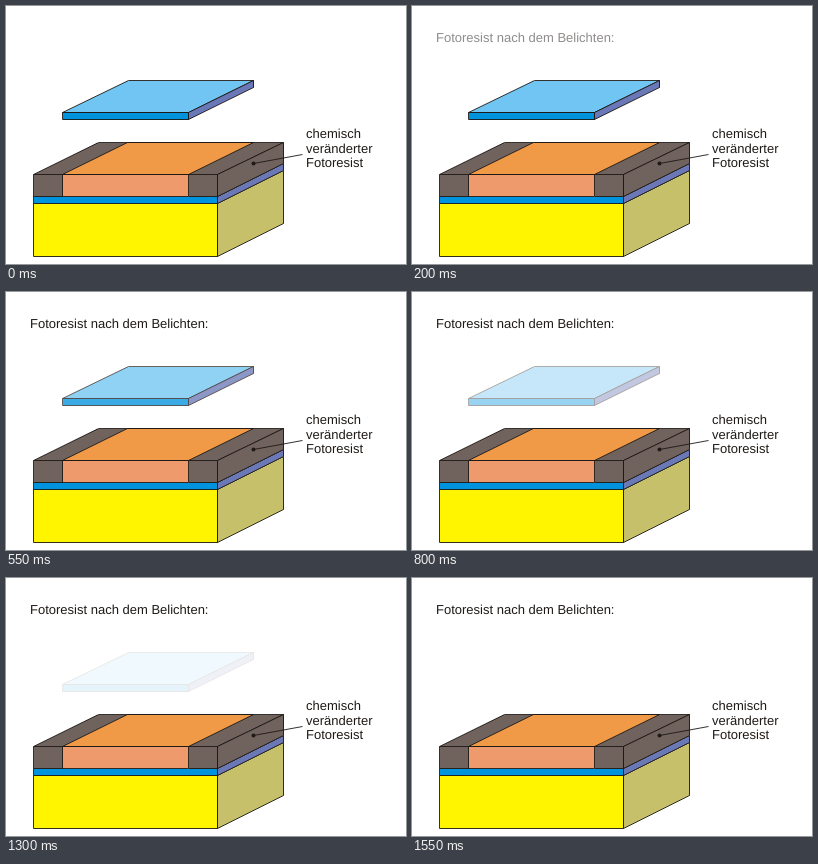
Write an HTML page that moves like this. It is 400 px wide and 258 px high and loops after 3.55 s.

```html
<!DOCTYPE html>
<html lang="de">
<head>
<meta charset="utf-8">
<title>Fotoresist</title>
<style>
  html, body { margin: 0; width: 100%; height: 100%; overflow: hidden; background: #fff; }
  svg { display: block; width: 400px; height: 258px; }
  text { font: 13px "Liberation Sans", Arial, sans-serif; fill: #1f1a17; text-rendering: geometricPrecision; }
  /* slightly under 1px keeps the aliased diagonals one pixel thick */
  .solid { stroke: #1f1a17; stroke-width: .9; stroke-linejoin: round; shape-rendering: crispEdges; }
  .dark { fill: #70625c; }
  .blue { fill: #0093dd; }
  .violet { fill: #6a78b8; }

  .title { animation: appear 3550ms step-end infinite; }
  .plate { animation: vanish 3550ms step-end infinite; }

  @keyframes appear {
    0% { opacity: 0; }
    2.816% { opacity: .25; }
    5.633% { opacity: .5; }
    8.45% { opacity: .8; }
    15.49%, 100% { opacity: 1; }
  }
  @keyframes vanish {
    0% { opacity: 1; }
    15.49% { opacity: .77; }
    22.53% { opacity: .4; }
    29.57% { opacity: .2; }
    36.61% { opacity: .1; }
    43.66%, 100% { opacity: 0; }
  }
</style>
</head>
<body>
<svg viewBox="0 0 400 258">
  <text class="title" x="24" y="36">Fotoresist nach dem Belichten:</text>

  <g class="solid" transform="translate(.5 .5)">
    <!-- substrate -->
    <path fill="#fff500" d="M27 197H211V250H27Z"/>
    <path fill="#c5c069" d="M211 197L277 164V217L211 250Z"/>
    <!-- thin layer -->
    <path class="blue" d="M27 190H211V197H27Z"/>
    <path class="violet" d="M211 190L277 157V164L211 197Z"/>
    <!-- resist -->
    <path class="dark" d="M27 168L92 136H277L211 168V190H27Z"/>
    <path class="dark" d="M211 168L277 136V157L211 190Z"/>
    <path fill="#f09a48" d="M56 168L121 136H247L182 168Z"/>
    <path fill="#ee9a6c" d="M56 168H182V190H56Z"/>
    <path fill="none" d="M27 168H211"/>
  </g>

  <g class="plate">
    <g class="solid" transform="translate(.5 .5)">
      <path fill="#70c5f2" d="M56 106L122 74H247L182 106Z"/>
      <path class="blue" d="M56 106H182V113H56Z"/>
      <path class="violet" d="M182 106L247 74V81L182 113Z"/>
    </g>
  </g>

  <path class="solid" d="M247.5 157.5L296.5 148.5"/>
  <circle cx="247.5" cy="157.5" r="2" fill="#1f1a17"/>
  <text x="300" y="132">chemisch</text>
  <text x="300" y="147">veränderter</text>
  <text x="300" y="161">Fotoresist</text>
</svg>
</body>
</html>
```
